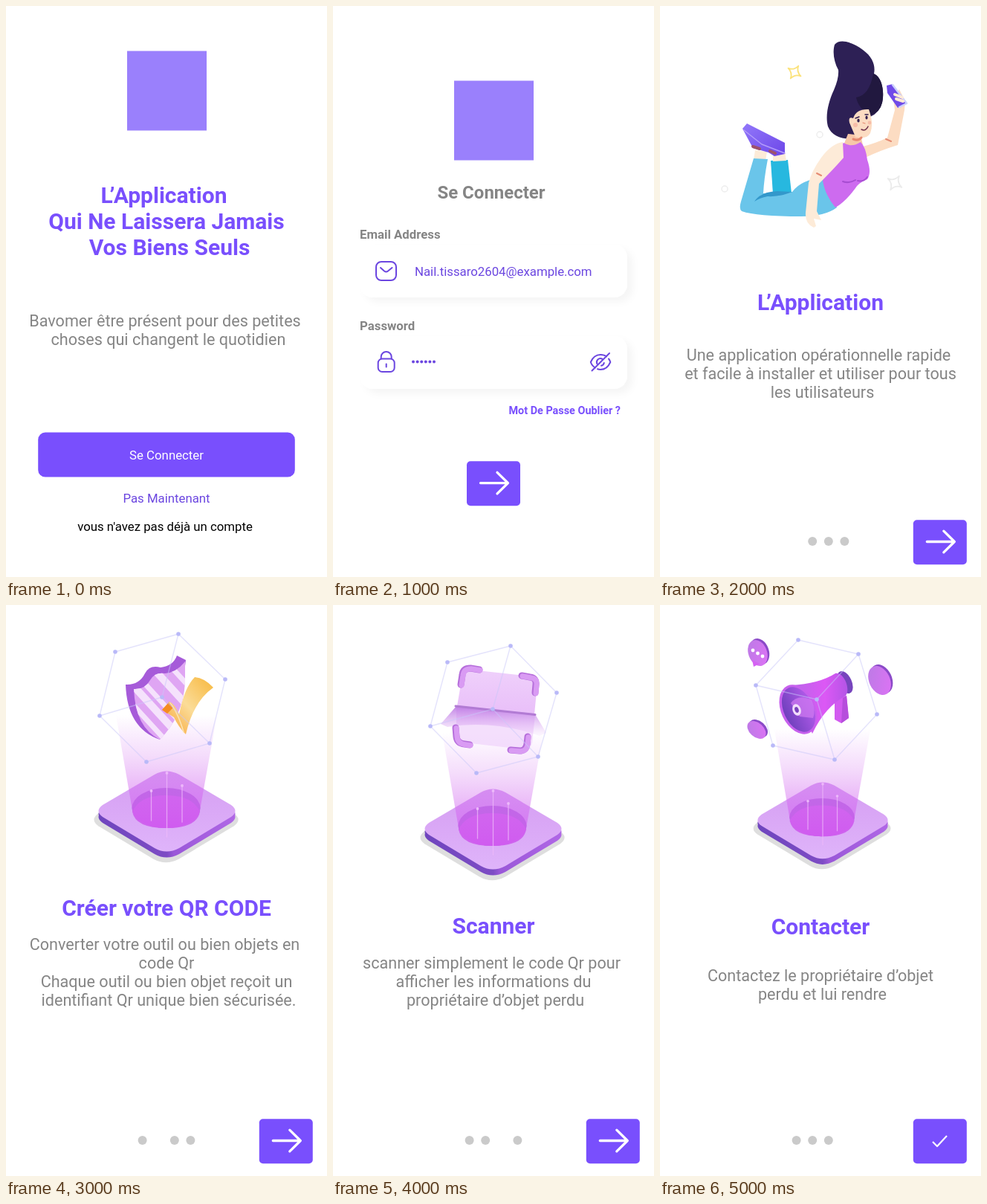
An HTML page for the animation above (6 s loop, 432 px wide and 768 px high).

```html
<!DOCTYPE html>
<html lang="fr">
<head>
<meta charset="utf-8">
<title>Onboarding</title>
<style>
html, body { margin: 0; width: 100%; height: 100%; overflow: hidden; background: #fff; }
svg { display: block; width: 100vw; height: 100vh; }
text { font-family: Roboto, sans-serif; }
.line { fill: none; stroke-linecap: round; stroke-linejoin: round; }
</style>
</head>
<body>
<svg id="stage" viewBox="0 0 432 768"></svg>
<script>
const VIOLET = '#794ffd', INK = '#6b46e0', GREY = '#858585';
const SCREEN_MS = 1000;

// Drawing helpers
const shape = (d, fill, extra = '') => `<path d="${d}" fill="${fill}" ${extra}/>`;
const line = (d, color, width, extra = '') =>
  `<path class="line" d="${d}" stroke="${color}" stroke-width="${width}" ${extra}/>`;
const dot = (x, y, r, fill, extra = '') => `<circle cx="${x}" cy="${y}" r="${r}" fill="${fill}" ${extra}/>`;
const oval = (x, y, rx, ry, turn, fill, extra = '') =>
  `<ellipse cx="${x}" cy="${y}" rx="${rx}" ry="${ry}" fill="${fill}" transform="rotate(${turn} ${x} ${y})" ${extra}/>`;
const box = (x, y, w, h, r, fill, extra = '') =>
  `<rect x="${x}" y="${y}" width="${w}" height="${h}" rx="${r}" fill="${fill}" ${extra}/>`;
const group = (transform, content) => `<g transform="${transform}">${content}</g>`;
const text = (content, x, y, size, fill, weight = 400, anchor = 'middle') =>
  `<text x="${x}" y="${y}" font-size="${size}" fill="${fill}" font-weight="${weight}" text-anchor="${anchor}">${content}</text>`;
const title = (content, y, x = 216) => text(content, x, y, 30, VIOLET, 700);
const body = (y, ...lines) => lines.map(([s, x], i) => text(s, x, y + i * 25.2, 21.6, GREY)).join('');
const gradient = (id, direction, ...stops) => `<linearGradient id="${id}" ${direction}>` +
  stops.map(([at, color, alpha = 1]) => `<stop offset="${at}" stop-color="${color}" stop-opacity="${alpha}"/>`).join('') +
  '</linearGradient>';

const DOWN = 'x1="0" y1="0" x2="0" y2="1"', ACROSS = '', DIAGONAL = 'x1="0" y1="0" x2="1" y2="1"';
const SHIELD = 'M172 113Q187 114 194 101Q200 90 214 92Q229 91 241 76L241 105Q238 150 207 181Q174 165 172 113Z';
const defs = `<defs>
  ${gradient('side', ACROSS, [0, '#6f45be'], [.5, '#7d4cc4'], [.55, '#9a58d8'], [1, '#b067e6'])}
  ${gradient('top', DOWN, [0, '#d59df2'], [1, '#dfb4fa'])}
  ${gradient('beam', DOWN, [0, '#d56df2', 0], [.35, '#d678f0', .25], [1, '#d058f0', .75])}
  ${gradient('gold', 'x1="1" y1="0" x2="0" y2="1"', [0, '#f7b73c'], [.5, '#fbdc98'], [1, '#f7a02e'])}
  ${gradient('fan', DOWN, [0, '#b56be0', .85], [1, '#e3b0f7', .1])}
  ${gradient('pane', DOWN, [0, '#efd0fb'], [1, '#e9bff9'])}
  ${gradient('horn', ACROSS, [0, '#b766e8'], [.6, '#dc58f5'], [1, '#b455e6'])}
  ${gradient('mouth', ACROSS, [0, '#6f40bd'], [1, '#b25bea'])}
  ${gradient('coin', DIAGONAL, [0, '#b97be4'], [1, '#df72f6'])}
  ${gradient('shoe', DIAGONAL, [0, '#9278fa'], [1, '#6c46e8'])}
  <clipPath id="shield"><path d="${SHIELD}"/></clipPath>
  <filter id="soft" x="-10%" y="-30%" width="120%" height="160%"><feDropShadow dx="7" dy="6" stdDeviation="5" flood-opacity=".04"/></filter>
</defs>`;

// Shared parts
const emblem = y => box(163, y, 107, 107, 0, '#9a80fc');
const arrowButton = (x, y) => group(`translate(${x} ${y})`,
  box(0, 0, 72, 60, 5, VIOLET) + line('M18.5 29.3H55.5M41 15L55.5 29.3L41 43.6', '#fff', 3.3));
const checkButton = box(340.8, 691.2, 72, 60, 5, VIOLET) + line('M367 722L373 728L386 714', '#fff', 2.2, 'style="stroke-linecap:butt"');
const nextButton = arrowButton(340.8, 691.2);
const pager = current => [0, 1, 2, 3].filter(i => i !== current)
  .map(i => dot(183.6 + i * 21.6, 720, 6, '#cacaca')).join('');

const DIAMOND = 'M200 228Q216 219 233 228L303 269Q314 277 303 285L233 327Q216 336 200 327L130 285Q119 277 130 269Z';
const platform = () =>
  group('translate(-12.9 -3.5) scale(1.055)', shape(DIAMOND, '#dedede')) +
  [8, 4].map(y => group(`translate(0 ${y})`, shape(DIAMOND, 'url(#side)'))).join('') +
  shape(DIAMOND, 'url(#top)') +
  oval(215.5, 273, 46, 27, 0, '#b166df') +
  shape('M170 278Q180 256 215 256Q251 256 261 278Q257 300 215.5 300Q174 300 170 278Z', '#cf63ee') +
  shape('M148 148H284L261.5 273A46 27 0 0 1 169.5 273Z', 'url(#beam)') +
  [[195.5, 250, 290], [216.5, 226, 312], [237, 243, 292]].map(([x, y, end]) =>
    line(`M${x} ${y}V${end}`, '#edb9fa', 1.3, 'opacity=".75"') + dot(x, y, 1.9, '#edb9fa')).join('');

// Six rim points, then the hub, which joins every other rim point.
const network = (points, firstSpoke) => {
  const rim = points.slice(0, 6), hub = points[6];
  const spokes = [0, 2, 4].map(i => `M${hub}L${rim[(firstSpoke + i) % 6]}`).join('');
  return line(`M${rim.join('L')}Z${spokes}`, '#c9c7fa', 1.4, 'opacity=".5"') +
    points.map(([x, y]) => dot(x, y, 2.8, '#b9b9f8')).join('');
};

// A pinched four-point star
const star = (x, y, r, color) => group(`translate(${x} ${y}) rotate(32)`,
  line(`M0 ${-r}Q1.5 -2 ${r} 0Q2 1.5 0 ${r}Q-1.5 2 ${-r} 0Q-2 -1.5 0 ${-r}Z`, color, 1.8));

// Illustrations
const flyingWoman = () => {
  const skin = '#fcdcc2', pale = '#fdebd8', blush = '#e58a72';
  return star(181, 89, 10, '#fbe27a') + star(316, 238, 11, '#ebebeb') +
    dot(215, 173, 4, 'none', 'stroke="#ededed" stroke-width="1.5"') +
    dot(87, 246, 4, 'none', 'stroke="#ededed" stroke-width="1.5"') +
    // legs and shoes
    shape('M149 208L172 207L177 252L152 253Z', '#27b8df') +
    shape('M128 194L144 196L142 208L126 207ZM152 196L168 196L170 208L152 209Z', pale) +
    shape('M126 205L145 206Q140 232 139 252L178 250Q190 233 221 231L238 271Q222 283 190 283Q130 283 110 276Q106 273 109 263Z', '#6ac5ea') +
    shape('M127 263Q135 250 158 249L178 250Q160 257 145 256Q134 258 127 263Z', '#3398cb') +
    shape('M111 165L117 158L168 184L168 199L154 202L146 197L125 191Z', 'url(#shoe)') +
    line('M113 167L137 186L168 198', '#b39cfb', 1.5) +
    line('M125 189L134 192M148 195L155 198', '#9e516c', 4) +
    // raised arm with phone
    shape('M269 190Q290 185 306 177L316 140L314 124L322 112L330 128L329 140L320 187Q297 194 276 204Z', skin) +
    shape('M305 107L313 105L333 131L320 137L306 117Z', '#704be8') +
    line('M313 106L332 131L322 136', '#cbd1fc', 2.5) +
    line('M316 119L326 123M318 125L327 128', pale, 4) +
    line('M304 179L311 182', blush, 2) +
    // hair, head and torso
    shape('M235 52C242 43 260 49 273 59C287 69 290 81 288 91C300 96 302 118 299 130Q296 143 283 149L265 177C250 181 232 177 226 162C222 147 227 128 234 113Q241 97 240 86C234 75 232 62 235 52Z', '#2d2055') +
    shape('M287 91C300 96 302 118 299 130Q296 143 283 147Q267 138 264 123Q282 120 287 91Z', '#21183f') +
    shape('M253 172L270 174L273 187Q260 198 247 187Z', '#f6c7a9') +
    shape('M255 157Q253 148 260 151Q264 138 281 139Q288 158 283 171Q278 180 263 176Z', skin) +
    line('M263 151L268 149M276 146L280 146', '#33204f', 1.5) +
    oval(267, 154, 1.7, 2.6, 0, '#33204f') + oval(278, 150, 1.6, 2.6, 0, '#33204f') +
    dot(263, 160, 3, '#f7bda8') + dot(282, 157, 2.4, '#f7bda8') +
    line('M271 166Q277 169 280 162', '#70304b', 1.5) + line('M273 157L276 158', blush, 1.2) +
    line('M260 179Q267 182 271 177', blush, 3) +
    shape('M247 184Q258 191 270 183Q277 190 279 207Q285 224 279 233Q267 238 263 245Q249 264 236 271Q222 254 219 235Q225 205 247 184Z', '#cd6bef') +
    line('M246 236Q254 239 263 234M266 235Q274 237 279 230', '#a84dd2', 2) +
    // lowered arm
    shape('M246 183Q231 185 217 204Q204 222 200 238L196 278Q195 293 207 298L210 296L207 286L217 288L211 276L214 239Q234 219 247 204Z', pale) +
    line('M211 225L217 228', blush, 2);
};

const shieldScene = () => {
  const stripes = [-58, -34, -16, 14, 40].map((x, i) =>
    line(`M${170 + x} 70L${280 + x} 190`, '#f5e2fc', i % 2 ? 10 : 7)).join('');
  return platform() +
    shape('M161 107Q179 108 187 92Q193 80 208 84Q225 82 230 68L242 74L240 90L207 181Q163 166 161 107Z', '#a65bd9') +
    shape(SHIELD, '#dfa5f3') + `<g clip-path="url(#shield)">${stripes}</g>` +
    shape('M210 141L220 130Q227 133 233 147Q240 111 254 97Q267 98 279 111Q252 130 242 174Q232 164 226 151Z', 'url(#gold)') +
    shape('M210 141L220 130L225 138L217 146Z', '#f58c22') +
    line('M220 131Q231 143 239 171', '#fce4b4', 1.5) +
    network([[147, 63], [232, 39], [295, 100], [274, 186], [189, 211], [126, 149], [210, 124]], 1);
};

const scannerScene = () => {
  const corner = d => line(d, '#b66fdb', 9) + group('translate(1 .7)', line(d, '#d99bf3', 7));
  return group('translate(-1 24)', platform()) +
    shape('M174 95Q176 86 185 87L267 96Q276 98 275 106L271 147L167 136Z', 'url(#pane)') +
    shape('M166 137L272 148L268 185Q266 195 255 194L176 185Q166 183 166 173Z', '#f1d4fb', 'opacity=".75"') +
    shape('M166 136L272 147L287 172L278 176Q215 154 154 164L145 160Z', 'url(#fan)') +
    corner('M172 107L174 94Q175 85 185 85L197 87') + corner('M254 95L265 97Q274 98 273 107L272 118') +
    corner('M165 165L166 177Q167 186 177 187L184 188') + corner('M239 195L251 196Q260 196 261 187L262 177') +
    line('M165 136L272 147.5', '#b27bd4', 3) +
    network([[154, 77], [239, 55], [301, 118], [276, 204], [193, 226], [131, 163], [215, 140]], 1);
};

const megaphoneScene = () => {
  const coin = (x, y, rx, ry, turn) => oval(x + 1.5, y - 1, rx, ry, turn, '#8b4ac8') + oval(x - 1, y + 1, rx, ry, turn, 'url(#coin)');
  return group('translate(12.9 25.7) scale(.952)', platform()) +
    coin(132.5, 63.5, 12.5, 18, -20) + shape('M124 74L126 83L134 79Z', '#d562f3') +
    [[125, 61], [131.5, 65], [138, 69]].map(([x, y]) => dot(x, y, 2.4, '#fff')).join('') +
    coin(296.5, 100.5, 14, 20.5, -25) + coin(131, 167, 9.5, 14.5, -48) +
    shape('M235 127L251 122L254 152L244 159L235 154Z', '#d25bf0') + shape('M246 125L251 122L254 152L244 159Z', '#b64edc') +
    oval(249, 104, 9, 16, -25, '#7745bd') +
    shape('M176 108Q214 106 236 92C247 90 257 112 250 122Q222 137 205 173Z', 'url(#horn)') +
    oval(186, 140.5, 23, 35, -25, '#c760ed') + oval(186.5, 140.5, 20, 32, -25, 'url(#mouth)') +
    shape('M176 132Q186 119 204 128Q210 142 206 152L188 150Z', '#d27bf3', 'opacity=".7"') +
    oval(184, 141, 5.5, 8, -20, '#f2ddfb') + oval(184, 141, 2.6, 4, -20, '#7a43bd') +
    network([[186, 47], [267, 66], [292, 147], [235, 208], [152, 189], [129, 108], [211, 127]], 1);
};

// Login form
const field = y => box(36, y, 360, 71, 18, '#fff', 'filter="url(#soft)"');
const mailIcon = box(58, 344, 27, 25, 7, 'none', `stroke="${INK}" stroke-width="2"`) +
  line('M64 352L69 356.5Q71.5 358.5 74 356.5L79.5 352', INK, 2);
const lockIcon = box(60.7, 474.5, 22, 17.5, 5.5, 'none', `stroke="${INK}" stroke-width="2"`) +
  line('M64.7 474.5V472A7 7 0 0 1 78.7 472V474.5M71.7 481.5V485.5', INK, 2);
const eyeIcon = line('M353 486.5Q348.5 484 346.8 479Q351 469 360 469Q365 469 368 471.5M371 474.5Q372.7 476.5 373.3 479Q369 489 360 489Q358 489 356 488.3M355.3 481A5 5 0 0 1 362 474.5M364.8 480A5 5 0 0 1 361 483.8M372 467L348.5 490.5', INK, 2);

const screens = [
  emblem(60.5) +
    title('L’Application', 265, 212.5) + title('Qui Ne Laissera Jamais', 300) + title('Vos Biens Seuls', 335, 220) +
    body(430.5, ['Bavomer être présent pour des petites', 214], ['choses qui changent le quotidien', 218.5]) +
    box(43.2, 573.6, 345.6, 60, 9.6, VIOLET) + text('Se Connecter', 216, 610.3, 16.8, '#fff') +
    text('Pas Maintenant', 216, 668, 16.8, INK) + text("vous n'avez pas déjà un compte", 214, 706, 16.8, '#000'),

  emblem(100.5) + text('Se Connecter', 213, 258.7, 24, GREY, 700) +
    text('Email Address', 36, 313.3, 16.8, GREY, 700, 'start') + field(321) + mailIcon +
    text('Nail.tissaro2604@example.com', 110, 362.5, 16.8, INK, 400, 'start') +
    text('Password', 36, 435.5, 16.8, GREY, 700, 'start') + field(444) + lockIcon + eyeIcon +
    [0, 1, 2, 3, 4, 5].map(i => dot(108 + i * 5.6, 478.5, 2, INK)).join('') +
    text('Mot De Passe Oublier ?', 387, 548.5, 14.4, VIOLET, 700, 'end') + arrowButton(180, 612.3),

  flyingWoman() + title('L’Application', 408.5) +
    body(477, ['Une application opérationnelle rapide', 213.5], ['et facile à installer et utiliser pour tous', 216], ['les utilisateurs', 218.5]) +
    pager(0) + nextButton,

  shieldScene() + title('Créer votre QR CODE', 418) +
    body(463.7, ['Converter votre outil ou bien objets en', 213.5], ['code Qr', 216], ['Chaque outil ou bien objet reçoit un', 216], ['identifiant Qr unique bien sécurisée.', 219]) +
    pager(1) + nextButton,

  scannerScene() + title('Scanner', 442) +
    body(488.7, ['scanner simplement le code Qr pour', 213.5], ['afficher les informations du', 216], ['propriétaire d’objet perdu', 218.5]) +
    pager(2) + nextButton,

  megaphoneScene() + title('Contacter', 443.3) +
    body(505.5, ['Contactez le propriétaire d’objet', 216], ['perdu et lui rendre', 218.5]) +
    pager(3) + checkButton,
];

const stage = document.getElementById('stage');
stage.innerHTML = defs + screens.map(content => `<g class="screen">${content}</g>`).join('');
const layers = [...stage.querySelectorAll('.screen')];

function render() {
  const current = Math.floor(performance.now() / SCREEN_MS) % layers.length;
  layers.forEach((layer, i) => layer.style.display = i === current ? '' : 'none');
  requestAnimationFrame(render);
}
render();
</script>
</body>
</html>
```
